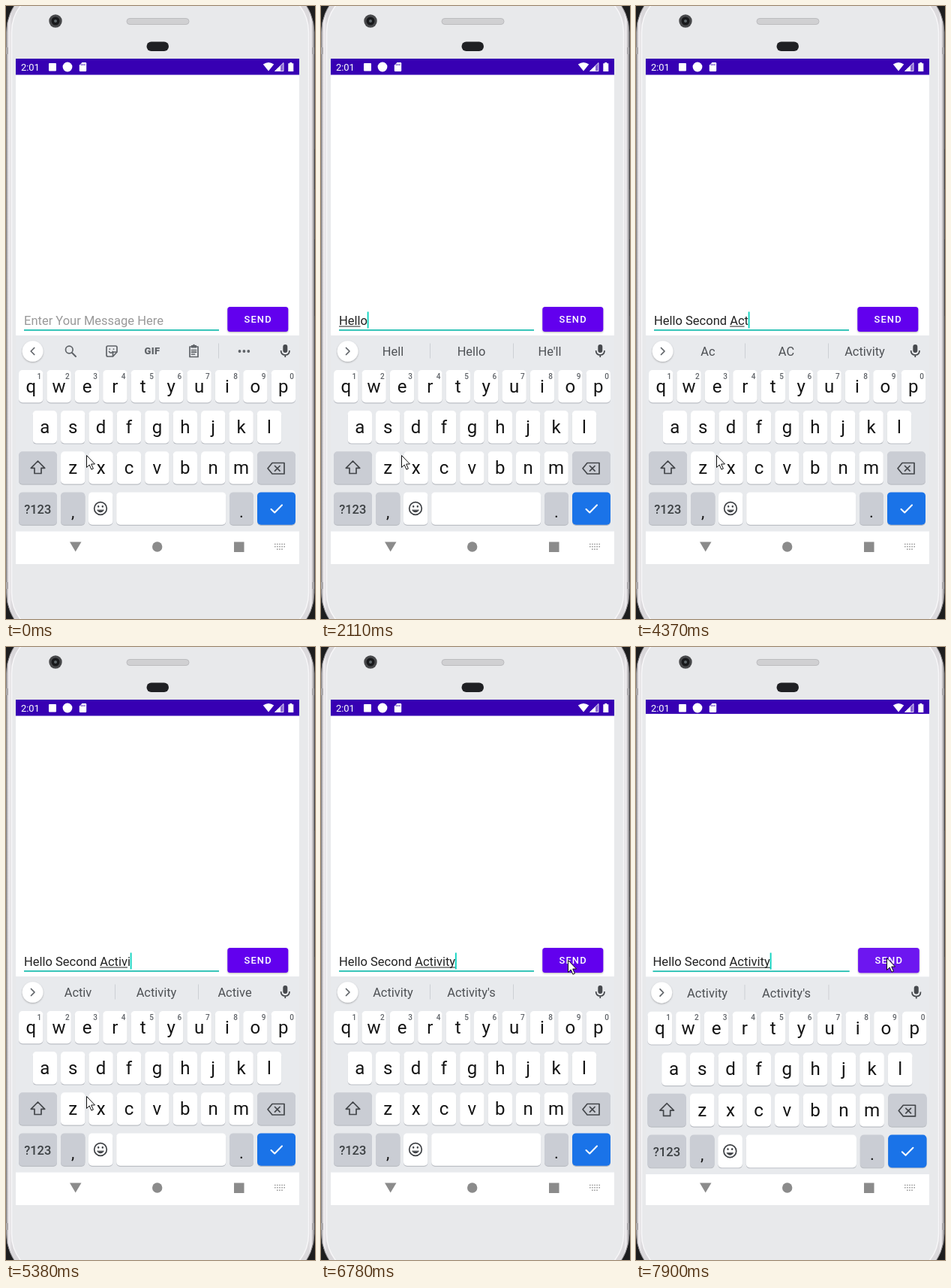
Animation, 412 px wide and 815 px high, one loop 8 s. Source, as an HTML page:

```html
<!DOCTYPE html>
<html lang="en">
<head>
<meta charset="utf-8">
<title>Message typing</title>
<style>
html, body { margin: 0; width: 100%; height: 100%; overflow: hidden; background: #1d1d1e; }
svg { display: block; width: 100%; height: 100%; }
text { font-family: Roboto, sans-serif; white-space: pre; }
.mid { text-anchor: middle; }
.icon { fill: none; stroke: #5f6368; stroke-width: 1.7; stroke-linecap: round; stroke-linejoin: round; }
.solid { fill: #5f6368; }
</style>
</head>
<body>
<svg viewBox="0 0 412 815">
  <defs>
    <clipPath id="screen"><rect x="13" y="70" width="378" height="672"/></clipPath>
    <linearGradient id="rim">
      <stop offset="0" stop-color="#9b999c"/><stop offset=".008" stop-color="#f3f0f3"/>
      <stop offset=".018" stop-color="#d9d7da"/><stop offset=".982" stop-color="#dcdadd"/>
      <stop offset=".99" stop-color="#f1eef1"/><stop offset="1" stop-color="#8f8d90"/>
    </linearGradient>
    <filter id="shade" x="-20%" y="-20%" width="140%" height="160%">
      <feDropShadow dx="0" dy="1" stdDeviation="1" flood-opacity=".3"/>
    </filter>
  </defs>

  <!-- phone body -->
  <path d="M411.5 190v54M411.5 310v102" stroke="#000" stroke-width="2"/>
  <rect x=".5" y="-30" width="410.5" height="875" rx="65" fill="url(#rim)" stroke="#858387"/>
  <path d="M0 55h3v9H0zM408 55h3v9h-3zM0 766h3v9H0zM408 766h3v9h-3z" fill="#aaa8ab"/>
  <rect x="7.5" y="-23" width="396" height="861" rx="58" fill="#e8e9eb" stroke="#f7f6f8" stroke-width="1.5"/>
  <circle cx="66" cy="20" r="8.7" fill="#47484a"/>
  <circle cx="66" cy="20" r="5.5" fill="#18191b"/>
  <circle cx="66" cy="20" r="2" fill="#5d6669"/>
  <rect x="161" y="16.5" width="83" height="8" rx="4" fill="#d0d0d2" stroke="#bcbcbf"/>
  <rect x="187.5" y="47.5" width="29.5" height="12.5" rx="6.2" fill="#1f2023"/>

  <!-- system bars -->
  <rect x="13" y="70" width="378" height="672" fill="#fff"/>
  <rect x="13" y="70" width="378" height="22" fill="#3700b3"/>
  <g fill="#fff">
    <text x="20" y="86" font-size="12.9">2:01</text>
    <rect x="57" y="76" width="10" height="10.5" rx="1"/>
    <circle cx="82" cy="81" r="6.4"/>
    <path d="M101.500 75h4.500q1.200 0 1.200 1.200v9.600q0 1.200-1.200 1.200h-7q-1.200 0-1.200-1.200v-7z"/>
    <path d="M342.800 77.500q7.200-5 14.400 0L350 86.500z"/>
    <path d="M370 75.500v11h-11.500z" opacity=".4"/>
    <path d="M366 79.500v7h-7.500z"/>
    <path d="M370 75.500v11h-11.500z" fill="none" stroke="#fff" stroke-width=".8"/>
    <path d="M378.300 75h3v1.300h2v10.700h-7V76.300h2z"/>
  </g>
  <path d="M100 777" fill="none"/>
  <path d="M100.300 76.800v2.400M102.600 76.800v2.400M104.900 76.800v2.400" stroke="#3700b3" stroke-width=".9"/>
  <g fill="#8b8b8b">
    <path d="M85 712.500h15.500L92.700 725.500z"/>
    <circle cx="201.700" cy="719" r="6.700"/>
    <rect x="304" y="712.500" width="13.500" height="13.500"/>
  </g>
  <path d="M358 715.500h14.500M358 718.700h14.500M361 722.300h8.500" stroke="#9a9a9a" stroke-width="1.500" stroke-dasharray="1.600 1.500"/>

  <!-- app and keyboard -->
  <g clip-path="url(#screen)"><g id="app">
    <rect x="13" y="91.500" width="378" height="347" fill="#fff"/>
    <rect x="24" y="430" width="260" height="1.800" fill="#22bfb2"/>
    <text id="hint" x="24" y="424" font-size="16.5" fill="#999">Enter Your Message Here</text>
    <text id="msg" x="24" y="424" font-size="16.5" fill="#222"></text>
    <rect id="under" y="425.500" height="1" fill="#222"/>
    <rect id="caret" y="406.500" width="1.900" height="22" fill="#10d3c0"/>
    <rect id="button" x="295.300" y="400" width="81" height="33" rx="3.500" filter="url(#shade)"/>
    <text x="317.500" y="421.300" font-size="12.9" font-weight="500" letter-spacing="1.15" fill="#fff">SEND</text>

    <rect x="13" y="438" width="378" height="260.500" fill="#e8eaed"/>
    <circle cx="35.600" cy="459" r="13.800" fill="#fff" filter="url(#shade)"/>
    <path id="chevron" class="icon"/>
    <g id="tools">
      <g class="icon">
        <circle cx="84.300" cy="457" r="4.800"/><path d="M88 461l5 5" stroke-width="2"/>
        <path d="M136 452h10q2 0 2 2v6l-5.500 6H136q-2 0-2-2v-10q0-2 2-2zM148 460h-3.500q-2 0-2 2v3.500M137.500 459.500q2.500 3.500 5 0M138.300 456v.2M143.500 456v.2"/>
        <path d="M245 453h11v13.500h-11zM247.500 457.500h6M247.500 460.200h6M247.500 463h4"/>
      </g>
      <path class="solid" d="M247 451h2q1.500-2.500 3 0h2v3.500h-7z"/>
      <text class="mid solid" x="195" y="463.300" font-size="13" font-weight="900" letter-spacing=".4">GIF</text>
      <path d="M283.500 448.500v20" stroke="#cdd0d4"/>
      <g class="solid"><circle cx="311.500" cy="459" r="1.900"/><circle cx="317.400" cy="459" r="1.900"/><circle cx="323.300" cy="459" r="1.900"/></g>
    </g>
    <g id="tips">
      <path d="M145.500 448.500v20M256.500 448.500v20" stroke="#cdd0d4"/>
      <g class="mid" font-size="16.4" fill="#4f5256">
        <text x="96" y="465"></text><text x="200.500" y="465"></text><text x="305" y="465"></text>
      </g>
    </g>
    <rect x="369.300" y="450" width="6" height="11" rx="3" fill="#46494d"/>
    <path class="icon" d="M366.600 458q0 6 5.700 6t5.700-6M372.300 464.500v2.500" style="stroke:#46494d;stroke-linecap:butt"/>

    <g id="keys"></g>
    <path class="icon" d="M42.500 605l9.200 9.300h-4.700v7.200h-9v-7.200h-4.700z" style="stroke:#44474b"/>
    <path class="icon" d="M355 607.500h16v14.500h-16l-6-7.250zM358.500 611.500l6.600 6.600M365.100 611.500l-6.600 6.600" style="stroke:#44474b"/>
    <g class="icon" style="stroke:#3f4246">
      <circle cx="126" cy="668" r="8.300"/><path d="M121.800 670.500q4.200 5 8.400 0z" fill="#3f4246" stroke-width="1"/>
      <path d="M123.200 665.300v.2M128.800 665.300v.2" stroke-width="2.400"/>
    </g>
    <path class="icon" d="M353.500 669l4.700 4.500 9.800-10" style="stroke:#fff;stroke-width:2"/>
  </g></g>

  <path id="pointer" d="M.5.5V16.500L4.200 13 6.900 19.200 9.400 18.100 6.700 12H11.500z" fill="#fff" stroke="#111" stroke-width="1"/>
</svg>
<script>
const LOOP = 8000, LEFT = 24, PITCH = 37.4;
const $ = id => document.getElementById(id);
const pen = document.createElement('canvas').getContext('2d');
pen.font = '16.5px Roboto, sans-serif';
const width = s => pen.measureText(s).width;

// [time, message, suggestions]; an empty third item keeps the tool icons
const typing = [
  [0, '', ''], [1240, 'H', ''],
  [1550, 'He', 'H|Hi|Hey'], [1690, 'Hel', 'He|Hey|Her'], [1830, 'Hel', 'Hel|Hello|Help'],
  [1970, 'Hell', 'Hel|Hello|Help'], [2110, 'Hello', "Hell|Hello|He'll"], [2260, 'Hello', 'Hello|Hey|Hellos'],
  [2540, 'Hello ', 'Hello|Hey|Hellos'], [2690, 'Hello S', 'I|How|The'], [2830, 'Hello Se', 'S|So|She'],
  [2980, 'Hello Sec', 'Se|See|Set'], [3120, 'Hello Seco', 'Sec|Second|Secret'],
  [3270, 'Hello Secon', 'Seco|Second|Seconds'], [3550, 'Hello Second', 'Secon|Second|Seconds'],
  [3690, 'Hello Second', 'Second|Seconds|Secondary'], [3820, 'Hello Second ', 'Second|Seconds|Secondary'],
  [3960, 'Hello Second A', 'time|day|one'], [4090, 'Hello Second Ac', 'A|And|At'],
  [4370, 'Hello Second Act', 'Ac|AC|Activity'], [4530, 'Hello Second Act', 'Act|Activity|Action'],
  [4680, 'Hello Second Acti', 'Act|Activity|Action'], [4830, 'Hello Second Acti', 'Acti|Activity|Action'],
  [5240, 'Hello Second Activ', 'Acti|Activity|Action'], [5380, 'Hello Second Activi', 'Activ|Activity|Active'],
  [5530, 'Hello Second Activit', 'Activi|Activity|Activities'],
  [5660, 'Hello Second Activity', 'Activit|Activity|Activities'],
  [5800, 'Hello Second Activity', "Activity|Activity's|"]
];
const caret = [[0, 0], [280, 1], [840, 0], [1240, 1], [6250, 0], [6780, 1], [7200, 0], [7630, 1]];
const pointer = [[0, 107, 597], [6110, 110, 594], [6250, 147, 564], [6390, 207, 515], [6520, 265, 467],
  [6650, 309, 432], [6780, 329, 416], [6930, 322, 420], [7080, 314, 423], [7200, 312, 424],
  [7630, 330, 415], [7770, 334, 413]];
const at = (list, t) => list.findLast(step => step[0] <= t);

function key(x, y, w, fill = '#fff') {
  return `<rect x="${x}" y="${y + 1.2}" width="${w}" height="43.3" rx="5" fill="#bcbfc5"/>
    <rect x="${x}" y="${y}" width="${w}" height="43.3" rx="5" fill="${fill}"/>`;
}
function label(s, x, y, size, fill = '#151515', weight = 400) {
  return `<text class="mid" x="${x}" y="${y}" font-size="${size}" fill="${fill}" font-weight="${weight}">${s}</text>`;
}
function buildKeys() {
  const gray = '#cacdd4';
  let out = '';
  [['qwertyuiop', 33.2], ['asdfghjkl', 51.8], ['zxcvbnm', 89.2]].forEach(([row, x0], r) => {
    [...row].forEach((c, i) => {
      const x = x0 + i * PITCH, y = 484 + r * 54.1;
      out += key(x - 16.2, y, 32.4) + label(c, x, y + 29.7, 24);
      if (!r) out += label((i + 1) % 10, x + 11.2, 495.5, 10, '#5f6368', 500);
    });
  });
  out += key(17, 592.2, 51, gray) + key(335, 592.2, 51, gray);
  [[17, 51, gray], [73, 32.4, gray], [110, 32.4], [147.2, 146], [298, 32, gray], [335, 51, '#1a73e8']]
    .forEach(([x, w, fill]) => out += key(x, 646.4, w, fill));
  $('keys').innerHTML = out + label('?123', 42.3, 674.5, 16.5, '#3c4043', 500) +
    label(',', 89.2, 679.5, 22) + label('.', 314, 679.5, 22);
}

function draw(t) {
  const [, text, tips] = at(typing, t);
  const words = tips.split('|');
  $('hint').style.display = text ? 'none' : '';
  $('msg').textContent = text;
  $('caret').setAttribute('x', LEFT + width(text) - (text ? .3 : 0));
  $('caret').style.display = at(caret, t)[1] ? '' : 'none';

  // the composing underline trails along with the first suggestion
  const start = text.lastIndexOf(' ') + 1;
  const marked = text.slice(start).startsWith(words[0]) ? words[0] : '';
  $('under').setAttribute('x', LEFT + width(text.slice(0, start)));
  $('under').setAttribute('width', width(marked));

  $('tools').style.display = tips ? 'none' : '';
  $('tips').style.display = tips ? '' : 'none';
  $('tips').querySelectorAll('text').forEach((el, i) => el.textContent = words[i] || '');
  $('chevron').setAttribute('d', tips ? 'M33.500 454.500l4.500 4.500-4.500 4.500' : 'M37.700 454.500l-4.500 4.500 4.500 4.500');

  const [, x, y] = at(pointer, t);
  $('pointer').setAttribute('transform', `translate(${x} ${y})`);
  $('button').setAttribute('fill', t >= 7770 ? '#6d13f0' : '#6200ee');
  const zoom = t >= 7900 ? 1.0085 : 1;
  $('app').setAttribute('transform', `translate(202 400) scale(${zoom}) translate(-202 -400)`);
}

buildKeys();
const begin = performance.now();
function frame() {
  draw((performance.now() - begin) % LOOP);
  requestAnimationFrame(frame);
}
frame();
</script>
</body>
</html>
```
